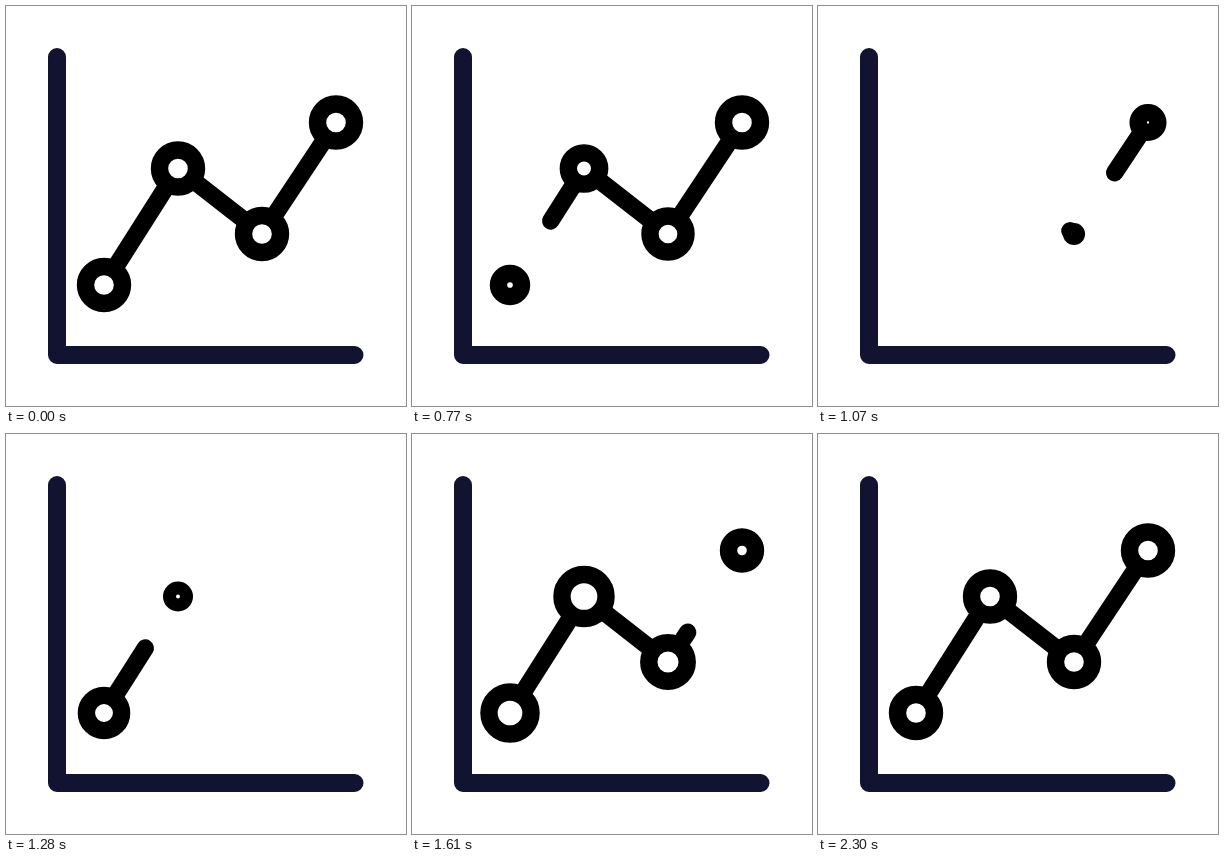
Animation of 400x400 px, one loop 2330 ms. Source, as an HTML page with a canvas:

```html
<!DOCTYPE html>
<html lang="en">
<head>
<meta charset="utf-8">
<title>Line chart</title>
<style>
  html, body { margin: 0; width: 100%; height: 100%; overflow: hidden; background: #fff; }
  canvas { display: block; width: 400px; height: 400px; }
</style>
</head>
<body>
<canvas id="stage" width="400" height="400"></canvas>
<script>
const ctx = document.getElementById('stage').getContext('2d');

const LOOP = 2330, HOLD = 530, STEP = 30;
const RADIUS = 18.5, PEAK = 22.2, WEIGHT = 17.4;

// Start times are counted in steps after the opening hold.
const nodes = [
  { x: 98, y: 279, hide: 1, show: 19 },
  { x: 172, y: 162.5, hide: 4, show: 23 },
  { x: 256, y: 228, hide: 7, show: 29 },
  { x: 330, y: 116.5, hide: 10, show: 32 }
];
const links = [
  { hide: 1, show: 19 },
  { hide: 6, show: 26 },
  { hide: 11, show: 32.6 }
];

const progress = (k, start, length) => Math.min(1, Math.max(0, (k - start) / length));
const smooth = x => x * x * (3 - 2 * x);
const mix = (a, b, x) => a + (b - a) * x;

function stroke(points, color, width) {
  ctx.beginPath();
  points.forEach(([x, y]) => ctx.lineTo(x, y));
  ctx.strokeStyle = color;
  ctx.lineWidth = width;
  ctx.stroke();
}

function drawLink({ hide, show }, i, k) {
  const a = nodes[i], b = nodes[i + 1];
  const growing = k >= show;
  const from = growing ? 0 : smooth(progress(k, hide, 15));
  const to = growing ? smooth(progress(k, show, 13)) : 1;
  if (to - from < 0.001) return;
  const at = x => [mix(a.x, b.x, x), mix(a.y, b.y, x)];
  stroke([at(from), at(to)], '#000', WEIGHT);
}

function nodeSize({ hide, show }, k) {
  if (k < show) {
    return {
      radius: RADIUS * Math.cos(progress(k, hide, 14) * Math.PI / 2),
      weight: WEIGHT * (1 - progress(k, hide + 11.5, 2.5))
    };
  }
  const grown = PEAK * Math.sin(progress(k, show, 12) * Math.PI / 2);
  const settle = smooth(progress(k, show + 12, 16));
  return {
    radius: grown - (PEAK - RADIUS) * settle,
    weight: WEIGHT * progress(k, show, 4)
  };
}

function drawNode(node, k) {
  const { radius, weight } = nodeSize(node, k);
  if (weight < 0.01) return;
  ctx.beginPath();
  ctx.arc(node.x, node.y, Math.max(0, radius), 0, Math.PI * 2);
  ctx.fillStyle = '#fff';
  ctx.fill();
  ctx.strokeStyle = '#000';
  ctx.lineWidth = weight;
  ctx.stroke();
}

function draw(time) {
  const t = time % LOOP;
  const k = t < HOLD ? 0 : Math.floor((t - HOLD) / STEP) + 1;
  ctx.fillStyle = '#fff';
  ctx.fillRect(0, 0, 400, 400);
  ctx.lineCap = ctx.lineJoin = 'round';
  stroke([[51, 51], [51, 349], [348.5, 349]], '#121331', 18);
  links.forEach((link, i) => drawLink(link, i, k));
  nodes.forEach(node => drawNode(node, k));
}

let origin = null;
function tick(now) {
  if (origin === null) origin = now;
  draw(now - origin);
  requestAnimationFrame(tick);
}
draw(0);
requestAnimationFrame(tick);
</script>
</body>
</html>
```
